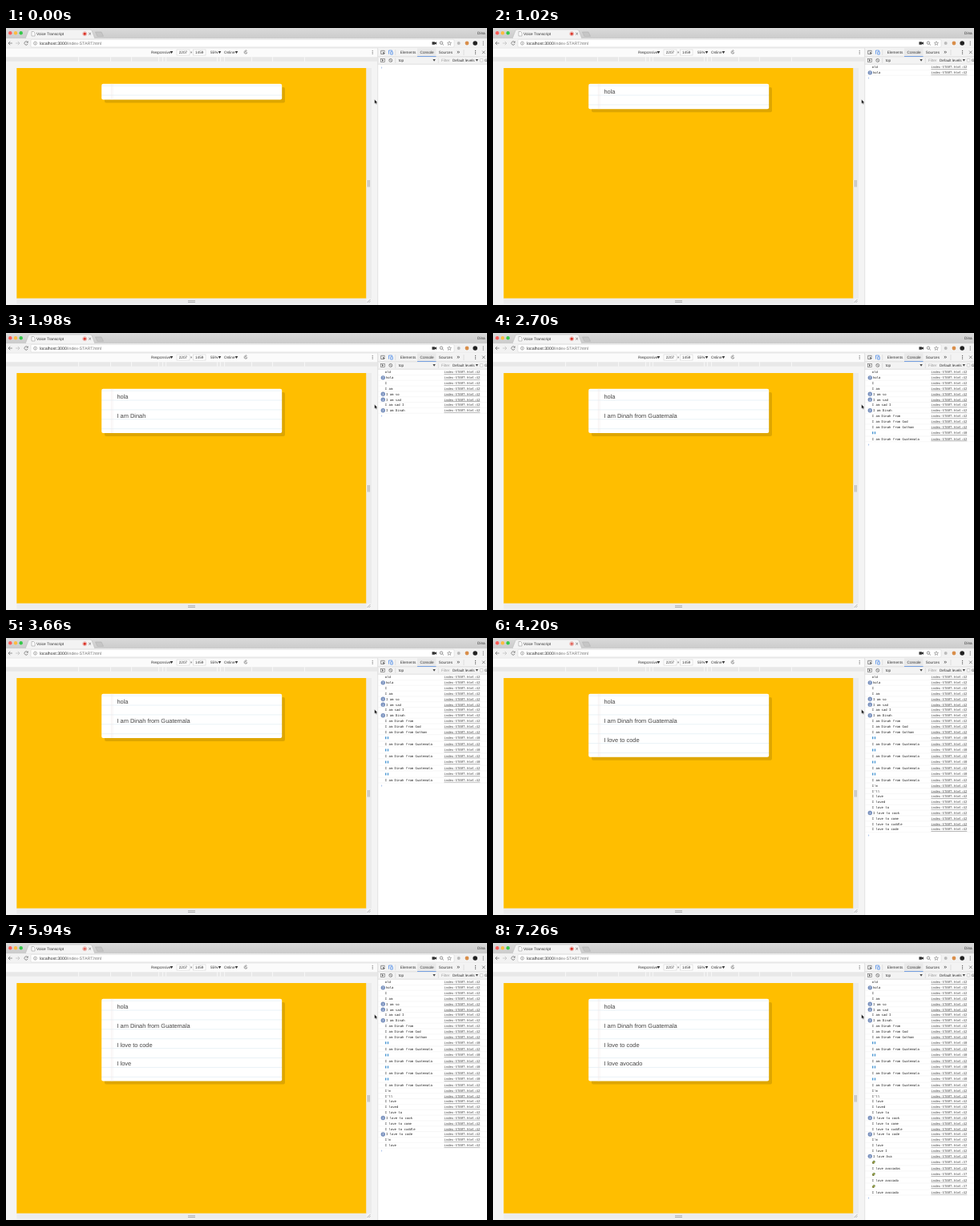
Animation of 600 by 346 pixels, one loop 7.32 s. Source, as an HTML page:

```html
<!DOCTYPE html>
<html lang="en">
<head>
<meta charset="utf-8">
<title>Voice Transcript</title>
<style>
html, body { margin: 0; width: 100%; height: 100%; overflow: hidden; background: #f3f3f3; }
svg { display: block; width: 600px; height: 346px; }
text { font: 5px "Liberation Sans", Arial, sans-serif; fill: #333; text-rendering: geometricPrecision; white-space: pre; }
.ui { font-size: 4.7px; }
.mono text { font: 3.93px "DejaVu Sans Mono", monospace; fill: #222; }
.mono .link { text-anchor: end; text-decoration: underline; fill: #444; }
.mono .count { text-anchor: middle; font-size: 3.8px; fill: #fff; }
.mono .prompt { font-size: 5px; fill: #4a7fd0; }
#words text { font-size: 7.45px; fill: #444; }
.line { fill: none; stroke: #666; stroke-width: .7; }
.rule { stroke: #d2d2d2; stroke-width: .6; }
</style>
</head>
<body>
<svg viewBox="0 0 600 346">
  <defs>
    <linearGradient id="bar" x2="0" y2="1"><stop stop-color="#dadada"/><stop offset="1" stop-color="#cbcbcb"/></linearGradient>
    <pattern id="ruled" x="119" y="71.6" width="300" height="11.9" patternUnits="userSpaceOnUse">
      <rect width="300" height="11.9" fill="#fff"/><rect width="300" height=".6" fill="#dcebf3"/>
    </pattern>
  </defs>

  <!-- window and tab -->
  <rect width="600" height="13.5" fill="url(#bar)"/>
  <circle cx="5.3" cy="6.2" r="2.2" fill="#fc5b57"/>
  <circle cx="12" cy="6.2" r="2.2" fill="#fdbc40"/>
  <circle cx="18.7" cy="6.2" r="2.2" fill="#34c84a"/>
  <path d="M24 13.5 28 3.2Q28.5 2 30 2H105Q106.5 2 107 3.2L111 13.5Z" fill="#f3f3f3" stroke="#b5b5b5" stroke-width=".5"/>
  <path d="M111.5 5H119L121.5 10.3H114Z" fill="#c6c6c6" stroke="#aaa" stroke-width=".5"/>
  <path d="M32 4.5H34.5L36 6V10H32Z" fill="#fff" stroke="#888" stroke-width=".5"/>
  <text x="38" y="9" font-size="4.8" style="font-size:4.8px">Voice Transcript</text>
  <circle cx="98.2" cy="7.2" r="2.5" fill="none" stroke="#e58a82" stroke-width=".6"/>
  <circle id="dot" cx="98.2" cy="7.2" r="1.7" fill="#dc3428"/>
  <path class="line" d="M103.2 5.8 106 8.6M106 5.8 103.2 8.6"/>
  <text x="588" y="8" class="ui">Dina</text>

  <!-- address bar -->
  <rect y="13.2" width="600" height="12" fill="#f2f2f2"/>
  <rect x="31" y="14.3" width="528" height="9.6" rx="1.3" fill="#fff" stroke="#d0d0d0" stroke-width=".5"/>
  <path class="line" d="M7.8 19H3M5.2 16.8 3 19 5.2 21.2"/>
  <path class="line" style="stroke:#bbb" d="M12 19H17M14.8 16.8 17 19 14.8 21.2"/>
  <path class="line" d="M27 17.7A2.2 2.2 0 1 0 27.2 19.8M27.3 16.5V18.2H25.5"/>
  <circle class="line" cx="36.5" cy="19.1" r="2" style="stroke-width:.5"/>
  <path class="line" d="M36.5 18.8V20.2M36.5 17.8V18.3" style="stroke-width:.5"/>
  <text x="42" y="20.9" style="font-size:5.25px">localhost:3000<tspan fill="#777">/index-START.html</tspan></text>
  <path d="M531.5 17.3H535V18.3L537 17.3V20.8L535 19.8V20.8H531.5Z" fill="#333"/>
  <circle class="line" cx="543" cy="18.6" r="1.7"/><path class="line" d="M544.3 19.9 546 21.5"/>
  <path class="line" d="M553 16.6 553.7 18.3 555.5 18.4 554.1 19.6 554.6 21.4 553 20.4 551.4 21.4 551.9 19.6 550.5 18.4 552.3 18.3Z" style="stroke-width:.5"/>
  <circle cx="564.7" cy="19" r="2" fill="#bbb"/>
  <circle cx="575" cy="19" r="2.4" fill="#d98e4a"/>
  <circle cx="585.2" cy="19" r="2.8" fill="#222"/>
  <g fill="#555"><circle cx="595.3" cy="17" r=".6"/><circle cx="595.3" cy="19" r=".6"/><circle cx="595.3" cy="21" r=".6"/></g>
  <path class="rule" d="M0 25.2H600"/>

  <!-- device toolbar -->
  <rect y="25.4" width="463" height="11" fill="#fbfbfb"/>
  <g class="ui">
    <text class="ui" x="181" y="32">Responsive</text>
    <text class="ui" x="255" y="32">55%</text>
    <text class="ui" x="272" y="32">Online</text>
    <rect x="213" y="27" width="16" height="7" fill="#fff" stroke="#ccc" stroke-width=".5"/>
    <rect x="233.5" y="27" width="15.5" height="7" fill="#fff" stroke="#ccc" stroke-width=".5"/>
    <text class="ui" x="215.7" y="32">2207</text><text class="ui" x="229.8" y="32">×</text><text class="ui" x="236" y="32">1459</text>
  </g>
  <path d="M204.7 29H208.3L206.5 32ZM264.7 29H268.3L266.5 32ZM285.7 29H289.3L287.5 32Z" fill="#333"/>
  <path class="line" d="M301 30.5A2 2 0 1 1 299.5 28.3M299 27.3 300.3 28.3 299.2 29.6M297.7 30.3 298.9 29.2 300.2 30.6 299 31.7Z" style="stroke-width:.5"/>
  <g fill="#555"><circle cx="457.2" cy="28.5" r=".55"/><circle cx="457.2" cy="30.3" r=".55"/><circle cx="457.2" cy="32.1" r=".55"/></g>
  <rect y="36.4" width="463" height="5.4" fill="#e8e8e8"/>
  <g id="media" stroke="#fafafa" stroke-width=".8"></g>

  <!-- page -->
  <rect y="41.8" width="463" height="304.2" fill="#f4f4f4"/>
  <rect x="13.3" y="50" width="436.2" height="287.8" fill="#ffbe00"/>
  <rect x="449.5" y="50" width="6.5" height="287.8" fill="#ececec"/>
  <rect x="13.3" y="337.8" width="436.2" height="6.7" fill="#ececec"/>
  <path class="line" style="stroke:#999" d="M451.5 190V198.5M453.3 190V198.5M227 340.7H236M227 342.5H236M450.5 343 454.5 339M452.7 343 454.5 341.2"/>
  <rect id="shade" x="123" y="74" width="225" rx="2" fill="#000" fill-opacity=".13"/>
  <rect id="card" x="119.2" y="69.8" width="225" rx="2" fill="url(#ruled)"/>
  <path id="margin" stroke="#efe4e4" stroke-width=".5"/>
  <g id="words"></g>

  <!-- developer tools -->
  <rect x="463.5" y="25.4" width="136.5" height="320.6" fill="#fff"/>
  <rect x="463.5" y="25.4" width="136.5" height="20" fill="#f3f3f3"/>
  <rect x="513" y="25.4" width="23.5" height="10.4" fill="#e9e9e9"/>
  <path class="rule" d="M463.7 25.2V346M464 35.8H600M464 45.2H600M485.7 27V34M485.7 37.5V44M539.3 37.5V44M571 27V34"/>
  <rect x="513" y="35.1" width="23.5" height=".8" fill="#5a8ee0"/>
  <path class="line" d="M471.5 32.5H467.7V28.3H472.2V29.8"/>
  <path d="M469.7 29.8 473.3 31.3 471.8 31.8 471.3 33.3Z" fill="#555"/>
  <path class="line" style="stroke:#3e82e8" d="M477.5 32.6V28H481.5V29.3M479.7 29.8H482.3V33H479.7Z"/>
  <text class="ui" x="491.8" y="32">Elements</text>
  <text class="ui" x="516.5" y="32">Console</text>
  <text class="ui" x="539.8" y="32">Sources</text>
  <text x="562.3" y="32" style="font-size:7px">»</text>
  <g fill="#555"><circle cx="585.6" cy="28.4" r=".6"/><circle cx="585.6" cy="30.3" r=".6"/><circle cx="585.6" cy="32.2" r=".6"/></g>
  <path class="line" d="M594 28.5 597.6 32.1M597.6 28.5 594 32.1"/>
  <rect class="line" x="467.5" y="38.3" width="4.8" height="4.2" style="stroke-width:.6"/>
  <path d="M469 39.1 471.2 40.4 469 41.7Z" fill="#555"/>
  <circle class="line" cx="479.8" cy="40.4" r="2"/><path class="line" d="M478.4 39 481.2 41.8"/>
  <text class="ui" x="489.7" y="42">top</text>
  <text class="ui" x="543" y="42" style="fill:#999">Filter</text>
  <text class="ui" x="557" y="42" style="font-size:4.6px">Default levels</text>
  <path d="M532.4 39H535.8L534.1 41.7ZM585.8 39H589L587.4 41.7Z" fill="#444"/>
  <rect x="591.3" y="38.5" width="3.6" height="3.6" rx=".6" fill="#fff" stroke="#aaa" stroke-width=".5"/>
  <text class="ui" x="597" y="42">G</text>
  <g id="log" class="mono"></g>
  <path d="M459.7 89.3V94.6L460.9 93.5 461.7 95.3 462.6 94.9 461.8 93.2H463.4Z" fill="#111" stroke="#fff" stroke-width=".3"/>
</svg>
<script>
const LOOP = 7320, ROW = 6.83, LINE = 11.9;
const FLAG = 40, FRUIT = 37;
const person = 'I am Dinah', place = person + ' from Guatemala';

// [time, paragraph, text or emoji's source line, time of the repeat badge]
const rows = [
  [300, 0, 'old'], [600, 0, 'hola', 900],
  [1140, 1, 'I'], [1260, 1, 'I am'], [1380, 1, 'I am so', 1440], [1500, 1, 'I am sad', 1560],
  [1620, 1, 'I am sad I'], [1800, 1, person, 1920],
  [2160, 1, person + ' from'], [2340, 1, person + ' from God'], [2520, 1, person + ' from Gotham'],
  ...[2640, 2820, 3000, 3180].flatMap(t => [[t, 1, FLAG], [t, 1, place]]),
  [3720, 2, "I'm"], [3780, 2, "I'll"], [3840, 2, 'I love'], [3900, 2, 'I loved'], [3960, 2, 'I love to'],
  [4080, 2, 'I love to cook', 4140], [4140, 2, 'I love to come'], [4140, 2, 'I love to cuddle'],
  [4200, 2, 'I love to code', 4500],
  [5040, 3, "I'm"], [5220, 3, 'I love'], [6000, 3, 'I love I'], [6060, 3, 'I love Ava', 6120],
  ...[[6180, 's'], [6240, ''], [6360, '']].flatMap(([t, end]) => [[t, 3, FRUIT], [t, 3, 'I love avocado' + end]])
];

const el = id => document.getElementById(id);
const label = (x, y, text, cls = '') => `<text x="${x}" y="${y}" class="${cls}">${text}</text>`;
const emoji = {
  [FLAG]: y => `<path d="M473 ${y - 1.5}h1.4v3h-1.4zM475.8 ${y - 1.5}h1.4v3h-1.4z" fill="#4a97d2"/>`,
  [FRUIT]: y => `<g transform="rotate(-45 474.8 ${y})"><ellipse cx="474.8" cy="${y}" rx="2.2" ry="1.5" fill="#55702f"/>` +
    `<ellipse cx="474.6" cy="${y}" rx="1.5" ry=".9" fill="#c9d46a"/><circle cx="474.2" cy="${y}" r=".6" fill="#7a4a25"/></g>`
};

el('media').innerHTML = [32, 36, 41, 75, 101, 141].map(d =>
  `<path d="M${231.5 - d} 36.4v5.4M${231.5 + d} 36.4v5.4"/>`).join('');

function drawLog(shown, t) {
  let y = 49, out = '';
  for (const [, , text, repeat] of shown) {
    const isEmoji = text in emoji, extra = isEmoji ? .7 : 0;
    y += extra;
    out += isEmoji ? emoji[text](y) : label(472.8 + (t >= repeat ? 1.2 : 0), y + 1.4, text);
    out += label(591.3, y + 1.4, 'index-START.html:' + (isEmoji ? text : 42), 'link');
    if (t >= repeat) out += `<circle cx="470.3" cy="${y}" r="2.7" fill="#7890bd"/>` + label(470.3, y + 1.4, 2, 'count');
    y += ROW + extra;
    out += `<path d="M464 ${y - ROW / 2}H600" stroke="#efefef" stroke-width=".5"/>`;
  }
  el('log').innerHTML = out + label(467, y + 1.8, '›', 'prompt');
}

function drawCard(shown) {
  const words = [];
  for (const [, p, text] of shown) if (!(text in emoji)) words[p] = text;
  const n = words.length, height = 19.7 + (n ? LINE * (2 * n - 1) - .2 : 0);
  el('card').setAttribute('height', height);
  el('shade').setAttribute('height', height - .2);
  el('margin').setAttribute('d', `M131.3 69.8v${height}M133 69.8v${height}`);
  el('words').innerHTML = words.map((w, i) => label(138.4, 82 + i * 2 * LINE, w)).join('');
}

let last = '';
function frame(now) {
  const t = now % LOOP;
  const shown = rows.filter(r => r[0] <= t);
  const state = shown.length + ':' + rows.filter(r => r[3] <= t).length;
  if (state !== last) {
    last = state;
    drawLog(shown, t);
    drawCard(shown);
  }
  el('dot').setAttribute('opacity', .85 + .15 * Math.cos(t / LOOP * 16 * Math.PI));
  requestAnimationFrame(frame);
}
frame(0);
</script>
</body>
</html>
```
